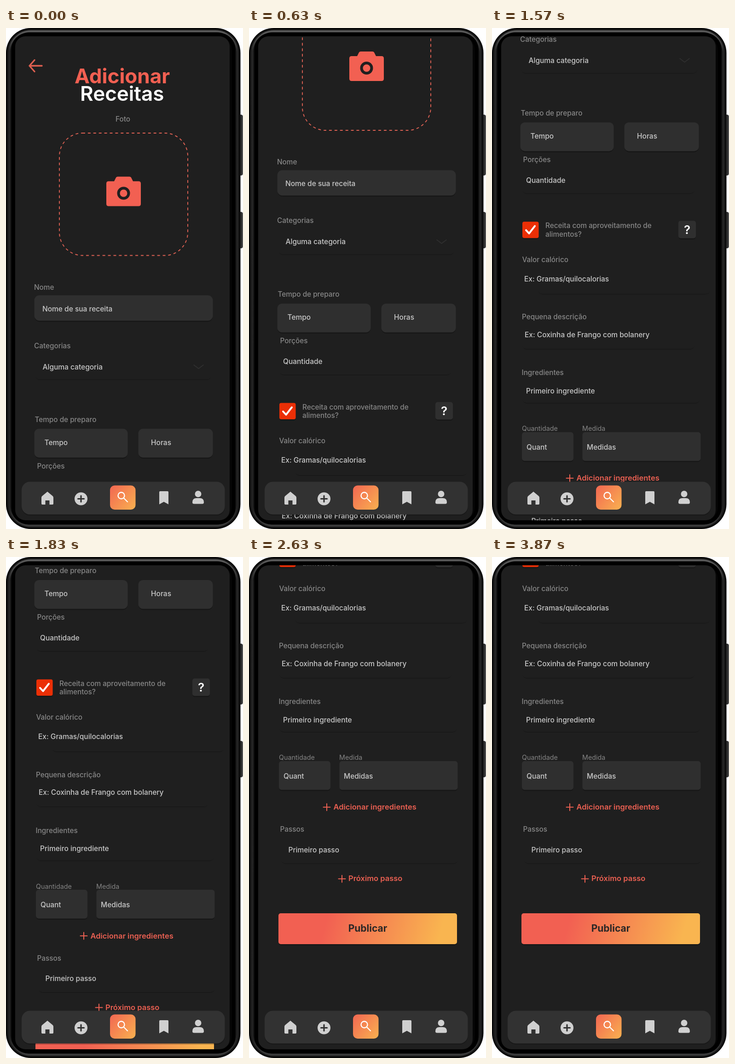
Write an HTML page that moves like this. It is 515 by 1087 pixels and loops after 4260 ms.

```html
<!DOCTYPE html>
<html lang="pt">
<head>
<meta charset="utf-8">
<title>Adicionar receitas</title>
<style>
  html, body { margin: 0; width: 100%; height: 100%; overflow: hidden; background: #fff; }
  svg { display: block; width: 515px; height: 1087px; }
  text { white-space: pre; }
  .label { font: 500 15.3px Inter, sans-serif; fill: #878787; }
  .small { font: 400 14.3px Inter, sans-serif; fill: #858585; }
  .field { font: 500 15.5px Inter, sans-serif; fill: #c9c9c9; }
  .link { font: 600 16.5px Inter, sans-serif; fill: #ea6052; }
  .title { font: 700 44px Inter, sans-serif; }
  .line { fill: none; stroke-linecap: round; stroke-linejoin: round; }
</style>
</head>
<body>
<svg viewBox="0 0 515 1087">
  <defs>
    <linearGradient id="warm" gradientUnits="userSpaceOnUse" x1="170" y1="1880" x2="408" y2="1945">
      <stop offset="0" stop-color="#f26052"/>
      <stop offset="1" stop-color="#f9b550"/>
    </linearGradient>
    <linearGradient id="search" x1="0" y1="0.1" x2="1" y2="0.9">
      <stop offset="0" stop-color="#f26a52"/>
      <stop offset="1" stop-color="#f9ae50"/>
    </linearGradient>
    <linearGradient id="edge" x1="0" y1="0" x2="0" y2="1">
      <stop offset="0" stop-color="#5a5a5a"/>
      <stop offset="0.04" stop-color="#262626"/>
      <stop offset="0.97" stop-color="#222"/>
      <stop offset="1" stop-color="#3a3a3a"/>
    </linearGradient>
    <linearGradient id="key" x1="0" y1="0" x2="1" y2="0">
      <stop offset="0" stop-color="#0a0a0a"/>
      <stop offset="0.6" stop-color="#3c3c3c"/>
      <stop offset="1" stop-color="#1c1c1c"/>
    </linearGradient>
    <clipPath id="screen"><rect x="20" y="18" width="466" height="1050" rx="22"/></clipPath>
  </defs>

  <!-- phone body -->
  <rect x="504" y="188" width="10.500" height="132" rx="4" fill="url(#key)"/>
  <rect x="504" y="399" width="10.500" height="79" rx="4" fill="url(#key)"/>
  <rect width="509.500" height="1087" rx="54" fill="#060606"/>
  <g fill="none">
    <rect x="6" y="6" width="497.500" height="1075" rx="48" stroke="#141414" stroke-width="8"/>
    <rect x="7" y="7" width="495.500" height="1073" rx="47" stroke="url(#edge)" stroke-width="4"/>
    <rect x="10.500" y="10.500" width="488.500" height="1066" rx="43" stroke="#161616" stroke-width="3"/>
    <rect x="15.500" y="14.500" width="479" height="1058" rx="32" stroke="#000" stroke-width="8"/>
  </g>
  <rect x="20" y="18" width="466" height="1050" rx="22" fill="#1f1f1f"/>

  <g clip-path="url(#screen)">
    <g id="page">
      <path class="line" d="M78 82H51M62 69.500L51 82L62 94.500" stroke="#dd5f50" stroke-width="3.400"/>
      <text class="title" x="149" y="119.500" fill="#f26052">Adicionar</text>
      <text class="title" x="161" y="158" fill="#fff" style="font-weight:600">Receitas</text>
      <rect x="116" y="228" width="279" height="265.500" rx="50" fill="none"
        stroke="#dc6053" stroke-width="1.900" stroke-dasharray="5.950"/>
      <path d="M223 332.500H235L239 324.500Q240 322.500 243 322.500H268Q271 322.500 272 324.500L276 332.500H288Q293 332.500 293 337.500V381.500Q293 386.500 288 386.500H223Q218 386.500 218 381.500V337.500Q218 332.500 223 332.500Z" fill="#f26052"/>
      <circle cx="255.500" cy="358.500" r="11" fill="none" stroke="#201f1f" stroke-width="6"/>
    </g>
  </g>

  <!-- bottom bar -->
  <rect x="34" y="987" width="441.500" height="71" rx="18" fill="#000" opacity="0.2"/>
  <rect x="34" y="984.500" width="441.500" height="71" rx="18" fill="#323232"/>
  <g fill="#d0d0d0">
    <path d="M90 1006L101.500 1015.500Q103 1017 103 1019V1032Q103 1034 101 1034H94.500V1025H85.500V1034H79Q77 1034 77 1032V1019Q77 1017 78.500 1015.500Z"/>
    <circle cx="163" cy="1021.500" r="14"/>
    <path d="M335 1005H351Q353 1005 353 1007V1033.500L343 1028L333 1033.500V1007Q333 1005 335 1005Z"/>
    <circle cx="417.500" cy="1011" r="7"/>
    <path d="M405 1029Q405 1020 414 1020H421Q430 1020 430 1029Q430 1032.500 426.500 1032.500H408.500Q405 1032.500 405 1029Z"/>
  </g>
  <path class="line" d="M156.500 1021.500H169.500M163 1015V1028" stroke="#323232" stroke-width="3.200"/>
  <rect x="226" y="992.500" width="55.500" height="52.500" rx="10" fill="url(#search)"/>
  <g class="line" stroke="#fff" stroke-width="2.300">
    <circle cx="250.500" cy="1014.500" r="7"/>
    <path d="M255.500 1019.500L264 1028"/>
  </g>
</svg>
<script>
const NS = 'http://www.w3.org/2000/svg';
const page = document.getElementById('page');

function add(tag, attrs, text) {
  const el = document.createElementNS(NS, tag);
  for (const k in attrs) el.setAttribute(k, attrs[k]);
  if (text) el.textContent = text;
  page.appendChild(el);
}

// mid is the middle of the capital letters
const write = (cls, x, mid, text) => add('text', { class: cls, x, y: mid + 5.5 }, text);

function box(x, y, width, height, rx, fill = '#2f2f2f') {
  add('rect', { x: x + 0.5, y: y + 2.5, width: width - 1, height, rx, fill: '#000', opacity: 0.25 });
  add('rect', { x, y, width, height, rx, fill });
}

// fields in the page colour show only their lower shadow
const ghost = (x, bottom, width) => {
  add('rect', { x, y: bottom - 28, width, height: 29, rx: 10, fill: '#181818' });
  add('rect', { x: x - 1, y: bottom - 32, width: width + 2, height: 31.5, rx: 10, fill: '#1f1f1f' });
};

const plus = (x, y) => add('path', {
  class: 'line', d: `M${x - 7.5} ${y}h15M${x} ${y - 7.5}v15`, stroke: '#ea6052', 'stroke-width': 2
});

ghost(64, 763, 382);
ghost(66, 1024, 374);
ghost(100, 1242, 374);
ghost(66, 1361.5, 374);
ghost(66, 1478.5, 386);
ghost(70, 1764, 384);

box(61.5, 580, 388, 55, 11);
box(61.5, 869.5, 203, 62.5, 10);
box(287.5, 869.5, 162, 62.5, 10);
box(65, 1541.5, 112, 62.5, 6);
box(196.5, 1541.5, 257, 62.5, 6);
box(405, 1083, 38, 38, 5);
box(66, 1085, 35.5, 35.5, 4, '#eb2f06');
box(64, 1871.7, 388, 67, 5, 'url(#warm)');

add('path', { class: 'line', d: 'M408 731l10.500 8l10.500-8', stroke: '#303030', 'stroke-width': 1.6 });
add('path', { class: 'line', d: 'M74 1103.500l6.500 7l12.500-16', stroke: '#fff', 'stroke-width': 4 });
add('text', {
  x: 424, y: 1111.5, 'text-anchor': 'middle', fill: '#fff', style: 'font:600 26px Inter,sans-serif'
}, '?');

write('label', 238, 197, 'Foto');
write('label', 61, 562, 'Nome');
write('label', 61, 689, 'Categorias');
write('label', 62.5, 849, 'Tempo de preparo');
write('label', 67.5, 950, 'Porções');
write('label', 116, 1093.5, 'Receita com aproveitamento de');
write('label', 116, 1112, 'alimentos?');
write('label', 65.5, 1167, 'Valor calórico');
write('label', 65, 1291.5, 'Pequena descrição');
write('label', 64.5, 1412.5, 'Ingredientes');
write('small', 65, 1533.5, 'Quantidade');
write('small', 196, 1533.5, 'Medida');
write('label', 67.5, 1689.5, 'Passos');

write('field', 79, 609, 'Nome de sua receita');
write('field', 79.5, 735, 'Alguma categoria');
write('field', 83.5, 899, 'Tempo');
write('field', 315, 899, 'Horas');
write('field', 74, 995, 'Quantidade');
write('field', 70, 1209, 'Ex: Gramas/quilocalorias');
write('field', 71, 1330, 'Ex: Coxinha de Frango com bolanery');
write('field', 74, 1452, 'Primeiro ingrediente');
write('field', 75, 1574, 'Quant');
write('field', 206, 1574, 'Medidas');
write('field', 85.5, 1734, 'Primeiro passo');

plus(169, 1641.5);
write('link', 183.5, 1641.5, 'Adicionar ingredientes');
plus(202, 1797);
write('link', 216, 1796.5, 'Próximo passo');
add('text', {
  x: 258, y: 1911.5, 'text-anchor': 'middle', fill: '#2b2726', style: 'font:700 21px Inter,sans-serif'
}, 'Publicar');

// three swipes: time in ms, scroll in px
const LOOP = 4260;
const KEYS = [
  [0, 0], [100, 18], [330, 135], [630, 271.5], [830, 335], [1030, 364],
  [1170, 364], [1270, 376.3], [1550, 650], [1830, 819.5], [1950, 855], [2070, 871],
  [2200, 871], [2300, 883], [2450, 1015], [2570, 1098.7], [LOOP, 1098.7]
];

const slope = i => (KEYS[i + 1][1] - KEYS[i][1]) / (KEYS[i + 1][0] - KEYS[i][0]);

// monotone tangent: harmonic mean of the neighbouring slopes
function tangent(i) {
  if (i === 0 || i === KEYS.length - 1) return 0;
  const a = slope(i - 1), b = slope(i);
  return a * b > 0 ? 2 * a * b / (a + b) : 0;
}

function scrollAt(t) {
  let i = 0;
  while (i < KEYS.length - 2 && t >= KEYS[i + 1][0]) i++;
  const [t0, y0] = KEYS[i], [t1, y1] = KEYS[i + 1];
  const h = t1 - t0, u = (t - t0) / h, v = 1 - u;
  return y0 * v * v * (1 + 2 * u) + y1 * u * u * (3 - 2 * u)
    + h * u * v * (tangent(i) * v - tangent(i + 1) * u);
}

// 30 pictures a second on a 10 ms grid
function snap(t) {
  const n = Math.floor((t + 4) * 0.03);
  return Math.round(n * 10 / 3) * 10;
}

function draw(now) {
  const y = scrollAt(Math.min(snap(now % LOOP), LOOP));
  page.setAttribute('transform', `translate(0 ${-y.toFixed(2)})`);
}

const start = performance.now();
function tick() {
  draw(performance.now() - start);
  requestAnimationFrame(tick);
}
draw(0);
requestAnimationFrame(tick);
</script>
</body>
</html>
```
